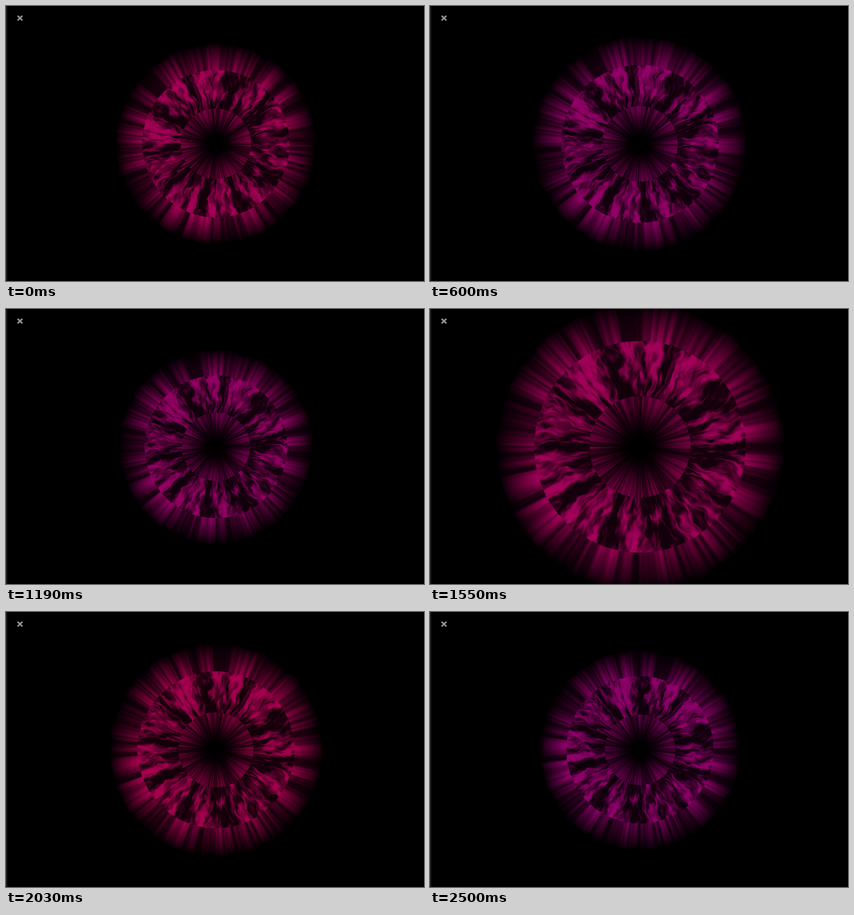
Recreate the animation shown at these times as an HTML page with a canvas. Size 657 by 432 pixels, loop 2600 ms.

```html
<!DOCTYPE html>
<html lang="en">
<head>
<meta charset="utf-8">
<title>Pulsing iris</title>
<style>
html, body { margin: 0; width: 100%; height: 100%; overflow: hidden; background: #000; }
canvas { display: block; }
</style>
</head>
<body>
<canvas id="stage" width="657" height="432"></canvas>
<script>
const ctx = document.getElementById('stage').getContext('2d');
const LOOP = 2600, FULL = 224, HALF = 232, CX = 330, CY = 216.5;

// Outer radius at each step of the pulse
const radii = [156, 172, 190, 202, 185, 167, 180, 191, 181, 165, 151,
               178, 204, 224, 199, 176, 168, 166, 179, 188, 161, 156];
const starts = radii.map((_, i) => Math.round(i * 11.92) * 10);

// time, rotation in degrees, red, blue
const keys = [
  [0, 13, 178, 92], [600, 30, 160, 112], [1190, 44, 160, 108], [1550, 55, 176, 96],
  [1790, 58, 180, 86], [2270, 68, 180, 84], [2500, 75, 156, 116]
];

const clamp = x => Math.min(1, Math.max(0, x));
const mix = (a, b, k) => a + (b - a) * k;
const smooth = (a, b, x) => { const k = clamp((x - a) / (b - a)); return k * k * (3 - 2 * k); };

function hash(x, y) {
  let h = Math.imul(x, 374761393) + Math.imul(y, 668265263) | 0;
  h = Math.imul(h ^ h >>> 13, 1274126177);
  return ((h ^ h >>> 16) >>> 0) / 4294967296;
}

// Value noise that closes on itself after n cells around the circle
function noise(turn, n, y) {
  const u = (turn - Math.floor(turn)) * n, x0 = Math.floor(u), y0 = Math.floor(y);
  const x1 = (x0 + 1) % n, kx = smooth(0, 1, u - x0), ky = smooth(0, 1, y - y0);
  return mix(mix(hash(x0, y0), hash(x1, y0), kx), mix(hash(x0, y0 + 1), hash(x1, y0 + 1), kx), ky);
}

function flames(turn, r) {
  const a = turn + (noise(turn, 40, r * 11) - .5) * .012 + (noise(turn, 140, r * 34) - .5) * .004;
  const cloud = noise(a, 74, r * 6) * .45 + noise(a, 150, r * 12) * .33 + noise(a, 310, r * 26) * .22;
  const vein = 1 - Math.abs(2 * noise(a, 90, r * 5 + 31) - 1);
  const gap = smooth(.3, .95, Math.cos(a * 20 * Math.PI));
  const heat = cloud + .2 * vein ** 6 - .24 * gap + .4 * (r - .55);
  return .1 + .82 * smooth(.26, .84, heat);
}

function rays(turn, row) {
  const s = noise(turn, 76, row) * .4 + noise(turn, 170, row) * .35 + noise(turn, 340, row) * .25;
  return .16 + .76 * smooth(.18, .88, s);
}

function glow(turn, r) {
  if (r < .355) return rays(turn, 3) * smooth(.05, .38, r) * .8;
  if (r < .742) return flames(turn, r);
  const rim = 1.02 - .025 * noise(turn, 90, 9);
  return rays(turn, 7) * clamp((rim - r) / .26) ** .8;
}

function makeIris() {
  const c = document.createElement('canvas'), size = c.width = c.height = HALF * 2;
  const g = c.getContext('2d'), img = g.createImageData(size, size);
  for (let i = 0; i < size * size; i++) {
    const x = i % size - HALF + .5, y = Math.floor(i / size) - HALF + .5;
    const light = 255 * glow(Math.atan2(x, -y) / (2 * Math.PI), Math.hypot(x, y) / FULL);
    img.data.set([light, light, light, 255], i * 4);
  }
  g.putImageData(img, 0, 0);
  return c;
}

const iris = makeIris();

function drawFrame(step) {
  const t = starts[step];
  let k = keys.length - 2;
  while (keys[k][0] > t) k--;
  const from = keys[k], to = keys[k + 1], p = (t - from[0]) / (to[0] - from[0]);
  const [turn, red, blue] = [1, 2, 3].map(i => mix(from[i], to[i], p));

  ctx.fillStyle = '#000';
  ctx.fillRect(0, 0, 657, 432);
  ctx.save();
  ctx.translate(CX, CY);
  ctx.rotate(turn * Math.PI / 180);
  ctx.scale(radii[step] / FULL, radii[step] / FULL);
  ctx.drawImage(iris, -HALF, -HALF);
  ctx.restore();

  ctx.globalCompositeOperation = 'multiply';
  ctx.fillStyle = `rgb(${red}, 0, ${blue})`;
  ctx.fillRect(0, 0, 657, 432);
  ctx.globalCompositeOperation = 'source-over';

  ctx.fillStyle = '#1c1c1c';
  ctx.fillRect(0, 0, 2, 432);
  ctx.strokeStyle = '#949494';
  ctx.lineWidth = 2.6;
  ctx.beginPath();
  ctx.moveTo(18.3, 15.3); ctx.lineTo(25.7, 22.7);
  ctx.moveTo(25.7, 15.3); ctx.lineTo(18.3, 22.7);
  ctx.stroke();
}

let shown = -1;
function tick() {
  const t = performance.now() % LOOP;
  let step = starts.length - 1;
  while (starts[step] > t) step--;
  if (step !== shown) drawFrame(shown = step);
  requestAnimationFrame(tick);
}
tick();
</script>
</body>
</html>
```
